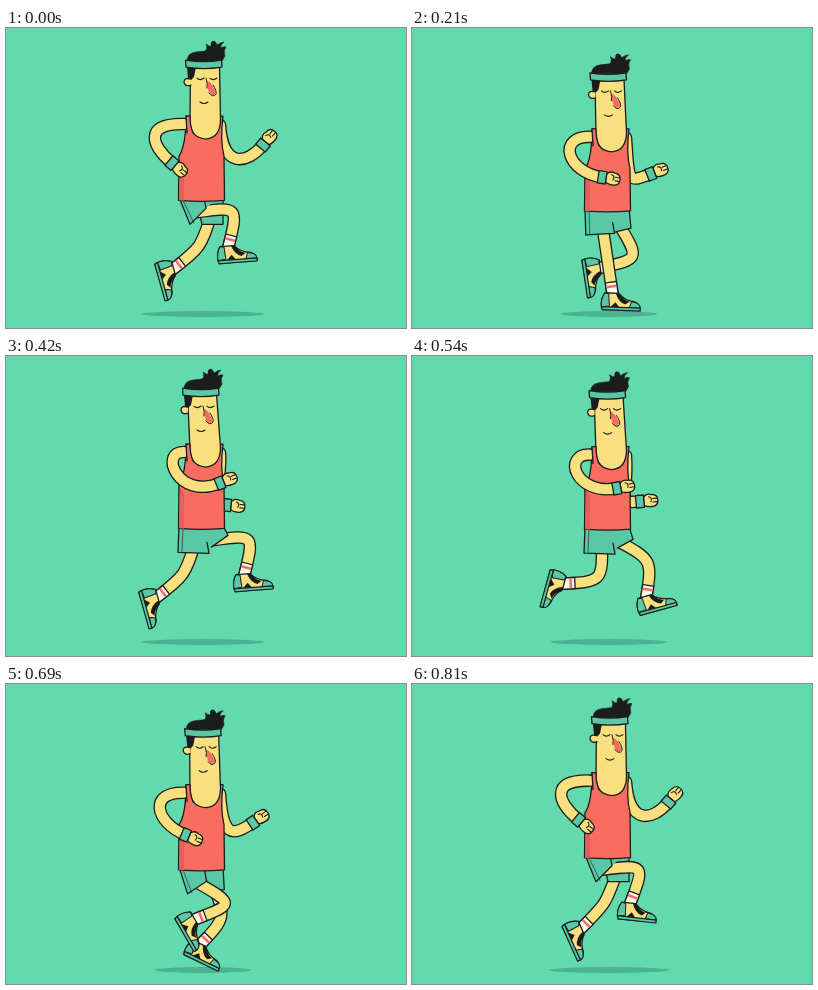
Animation, 400 px wide and 300 px high, one loop 840 ms. Source, as an HTML page with a canvas:

```html
<!DOCTYPE html>
<html lang="en">
<head>
<meta charset="utf-8">
<title>Runner</title>
<style>
html, body { margin: 0; height: 100%; overflow: hidden; background: #63d9ae; }
canvas { display: block; width: 400px; height: 300px; }
</style>
</head>
<body>
<canvas id="stage" width="400" height="300"></canvas>
<script>
const ctx = document.getElementById('stage').getContext('2d');
const LOOP = 840, TURN = 2 * Math.PI, BONE = 36;
const BACK = '#63d9ae', INK = '#1b1d1c', SKIN = '#f9e07f', RED = '#f96d61', DARK_RED = '#e0605a';
const GREEN = '#5ac8a7', WHITE = '#fbf8ee', SHADOW = '#4bb391';

// One stride of a foot at equal time steps: x from the hip, y on stage, tilt in degrees.
const STRIDE = [
  [32, 220, -4], [30, 238, -16], [11, 267, 2], [-28, 254, 44],
  [-40, 242, 74], [-42, 227, 106], [-20, 240, 82], [9, 231, 42]];

const mix = (a, b, u) => a + (b - a) * u;

// Periodic Catmull-Rom curve through the stride.
function footAt(t) {
  const n = STRIDE.length, pos = t / LOOP * n, i = Math.floor(pos), u = pos - i;
  const [p, a, b, q] = [-1, 0, 1, 2].map(k => STRIDE[(i + k + n) % n]);
  return a.map((v, j) => v + u / 2 * (b[j] - p[j]
    + u * (2 * p[j] - 5 * v + 4 * b[j] - q[j] + u * (3 * (v - b[j]) + q[j] - p[j]))));
}

// 0 in the air, 1 at the lowest point of each step.
const bobAt = t => ((1 - Math.cos(2 * TURN * t / LOOP - .45)) / 2) ** 1.8;

function shape(d, fill, line = 1.3) {
  const path = new Path2D(d);
  if (fill) { ctx.fillStyle = fill; ctx.fill(path); }
  if (line) { ctx.strokeStyle = INK; ctx.lineWidth = line; ctx.stroke(path); }
}

function at(x, y, angle, draw) {
  ctx.save();
  ctx.translate(x, y);
  ctx.rotate(angle);
  draw();
  ctx.restore();
}

function tube(d, width) {
  const path = new Path2D(d);
  for (const [color, w] of [[INK, width + 2.6], [SKIN, width]]) {
    ctx.strokeStyle = color;
    ctx.lineWidth = w;
    ctx.stroke(path);
  }
}

function shoe() {
  shape('M-8-2L6-2Q12 5 22 6Q28 8 28 14L-10 15Q-13 6-8-2Z', SKIN);
  shape('M-8-2L-4-1L-3 11L-11 12Q-12 5-8-2Z', GREEN, 1);
  shape('M19 6Q28 7 28 12L17 12Z', GREEN, 1);
  shape('M3-2L7-2Q11 5 17 6L13 9Q6 7 3-2Z', INK, 0);
  shape('M-2 12L3 7L7 12Z', INK, 0);
  shape('M-11 12L28 12L28 15L-10 15Z', GREEN, 1.2);
}

// Two equal bones fix the knee, which the leg bends round.
function legPose(x, y, t) {
  const [fx, fy, tilt] = footAt(t % LOOP);
  const dy = fy - y, dist = Math.hypot(fx, dy);
  const bend = Math.sqrt(Math.max(0, BONE ** 2 - dist ** 2 / 4)) / dist;
  return { x, y, footX: x + fx, footY: fy, tilt, kneeX: x + fx / 2 + dy * bend, kneeY: y + dy / 2 - fx * bend };
}

function leg({ x, y, footX, footY, tilt, kneeX, kneeY }) {
  const cx = (8 * kneeX - x - footX) / 6, cy = (8 * kneeY - y - footY) / 6;
  tube(`M${x} ${y}C${cx} ${cy} ${cx} ${cy} ${footX} ${footY}`, 10);
  at(footX, footY, Math.atan2(footY - cy, footX - cx), () => {
    shape('M-13-5.6L2-5.6L2 5.6L-13 5.6Z', WHITE);
    shape('M-10-5L-7.5-5L-7.5 5L-10 5Z', RED, 0);
  });
  at(footX, footY, tilt * Math.PI / 180, shoe);
}

// The upper arm leaves towards (cx, cy); the forearm arrives along the angle of the wrist.
function arm(x, y, cx, cy, wristX, wristY, degrees, reach) {
  const angle = degrees * Math.PI / 180;
  tube(`M${x} ${y}C${cx} ${cy} ${wristX - reach * Math.cos(angle)} ${wristY - reach * Math.sin(angle)} ${wristX} ${wristY}`, 10);
  at(wristX, wristY, angle, () => {
    shape('M4-4Q7-8 12-6Q18-6 18 0Q18 6 12 6Q6 6 4 4Z', SKIN);
    shape('M13-2L17-2M13 1.5L17 1.5M9-4Q13-3 11 1', null, 1.1);
    shape('M-4-6.2L4-6.2L4 6.2L-4 6.2Z', GREEN);
  });
}

function tank(s, w) {
  shape(`M180 ${s}L217 ${s}Q214 ${s + 24} 218 ${s + 40}L218.5 ${w}
    Q196 ${w + 2} 172.5 ${w}L173 ${s + 40}Q180 ${s + 30} 180 ${s}Z`, RED);
  shape(`M174 ${s + 44}L178 ${s + 49}L178 ${w + .3}L173 ${w}Z`, DARK_RED, 0);
}

function head(dx, band, s) {
  shape(`M${184.5 + dx} ${band + 6}L184 ${s + 6}Q185 ${s + 22} 200 ${s + 23}
    Q214 ${s + 22} 214.5 ${s + 4}L${213.5 + dx} ${band + 6}Z`, SKIN);
  at(dx, band - 33, 0, () => {
    shape('M181 40L190 40L188 50L185 53L182 51Z', INK, 0);
    shape('M185 52Q178 50 178 55Q179 60 185 58', SKIN);
    shape(`M181 34Q181 26 190 25L199 24Q202 22 200 17Q204 20 205 19Q205 14 207 14Q210 14 211 18
      Q215 15 218 15Q214 18 215 21Q218 19 220 20Q217 24 219 29L216 34Z`, INK, .6);
    shape('M179.5 33Q198 36 215.5 33L216 40Q198 43 180 40Z', GREEN);
    shape('M191 51Q194 54 198 51M204 51Q207 54 211 51', null, 1.1);
    shape('M201 54Q205 55 207 60Q211 66 208 68Q203 68 202 62Z', RED, 0);
    shape('M200 51Q202 57 201 61M203 66Q207 71 210 67Q211 64 207 58', null, 1);
    shape('M194 75Q198 78 202 75', null, 1.1);
  });
}

// Hems rise as the thigh swings forward.
const lift = pose => Math.max(0, (pose.kneeX - pose.x) / BONE);

function farShorts(w, f) {
  shape(`M190 ${w - 3}L217 ${w - 3}L${217 + 5 * f} ${w + 24 - 17 * f}L${196 + 9 * f} ${w + 24 - 5 * f}Z`, GREEN);
}

function nearShorts(w, f) {
  const side = `M173 ${w - 3}L${172 + 12 * f} ${w + 24}L${203 - 3 * f} ${w + 25 - 17 * f}`;
  shape(`${side}L212 ${w - 3}Z`, GREEN, 0);
  shape(`${side}l-2 -11`);
  shape(`M177 ${w}L${176 + 12 * f} ${w + 23}`, null, .6);
}

function draw(t) {
  const stride = Math.cos(TURN * t / LOOP), swing = (1 - stride) / 2, bob = bobAt(t);
  const shoulder = 88 + 14 * bob, waist = 172 + 14 * bobAt(t - 20);
  const near = legPose(190, waist + 12, t), far = legPose(206, waist + 12, t + LOOP / 2);

  ctx.fillStyle = BACK;
  ctx.fillRect(0, 0, 400, 300);
  ctx.fillStyle = SHADOW;
  ctx.beginPath();
  ctx.ellipse(197, 286, 61 - 14 * bob, 3, 0, 0, TURN);
  ctx.fill();

  arm(214, shoulder + 9, 217, shoulder + 52, 239 + 18 * stride, shoulder + 45 - 16 * stride, -22 - 28 * stride, 26);
  leg(far);
  farShorts(waist, lift(far));
  leg(near);
  nearShorts(waist, lift(near));
  tank(shoulder, waist);
  head(1.5 * (stride - 1), 32 + 14 * bob, shoulder);
  arm(178, shoulder + 8, mix(138, 153, swing), shoulder + 7,
    mix(166, 214, swing), shoulder + 47 - 8 * swing + 6 * bob, mix(40, -22, swing), mix(28, 46, swing));
  shape(`M180 ${shoulder}L184 ${shoulder}Q184 ${shoulder + 10} 187 ${shoulder + 17}L181 ${shoulder + 17}Z`, RED, 0);
  shape(`M181 ${shoulder + 17}L180 ${shoulder}L184 ${shoulder}Q184 ${shoulder + 10} 187 ${shoulder + 17}`);
}

ctx.lineJoin = ctx.lineCap = 'round';
const start = performance.now();
function tick() {
  draw((performance.now() - start) % LOOP);
  requestAnimationFrame(tick);
}
tick();
</script>
</body>
</html>
```
